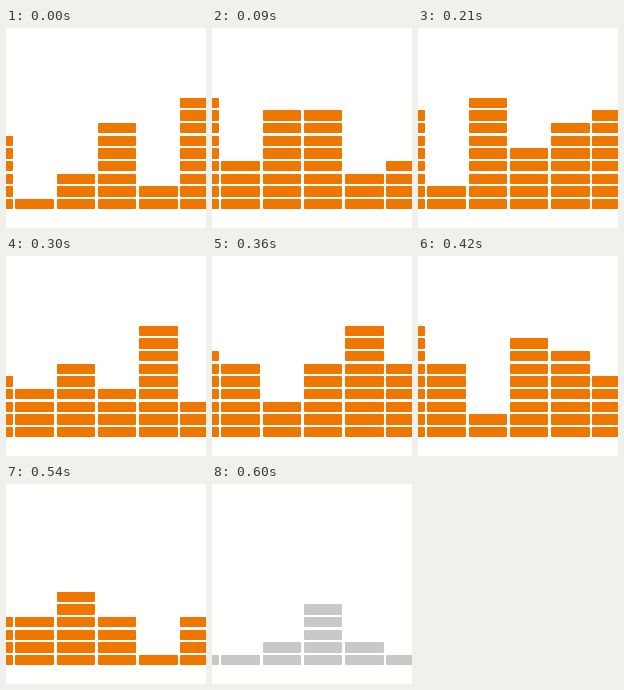
Recreate the animation shown at these times as an HTML page with a canvas. Size 200 px wide and 200 px high, loop 0.63 s.

```html
<!DOCTYPE html>
<html lang="en">
<head>
<meta charset="utf-8">
<title>Equalizer</title>
<style>
html, body { margin: 0; width: 100%; height: 100%; overflow: hidden; background: #fff; }
canvas { display: block; width: 200px; height: 200px; }
</style>
</head>
<body>
<canvas id="stage" width="200" height="200"></canvas>
<script>
const ctx = document.getElementById('stage').getContext('2d');
const STEP = 30, STEPS = 21, IDLE = 19;
const ORANGE = '#ef7700', GREY = '#c8c8c8';
const LEFT = -31.9, BAR_W = 38.6, BAR_PITCH = 41.25;
const BASE = 170.8, BLOCK_H = 10.4, ROW_PITCH = 12.63;

// A bar swings around a slowly drifting level; `peak` is the step of its first crest
const wave = (mid, drift, swing, period, peak) => step =>
  mid + drift * step + swing * Math.cos(2 * Math.PI * (step - peak) / period);

const bars = [
  wave(8.5, -0.15, 2.4, 9.4, 5),
  wave(1.98, 0.23, 1.85, 9.4, 3.3),
  wave(5.85, 0, 3.65, 16, 5.8),
  wave(6.6, -0.08, 2.15, 11.5, 2.7),
  wave(6.38, -0.1, 4.1, 19, 10.4),
  wave(7.05, -0.2, 2.5, 6.22, 0.5)
];

// At rest the bars form a small peak around the fourth one
const rest = col => 5 - 3 * Math.abs(col - 3);

function block(col, row) {
  const x = LEFT + col * BAR_PITCH, y = BASE - row * ROW_PITCH;
  const left = Math.round(x), top = Math.round(y);
  ctx.roundRect(left, top, Math.round(x + BAR_W) - left, Math.round(y + BLOCK_H) - top, 1);
}

function draw(step) {
  const idle = step >= IDLE;
  ctx.fillStyle = '#fff';
  ctx.fillRect(0, 0, 200, 200);
  ctx.fillStyle = idle ? GREY : ORANGE;
  ctx.beginPath();
  bars.forEach((level, col) => {
    const count = Math.max(1, Math.round(idle ? rest(col) : level(step)));
    for (let row = 0; row < count; row++) block(col, row);
  });
  ctx.fill();
}

const start = performance.now();
function tick() {
  draw(Math.floor((performance.now() - start) / STEP) % STEPS);
  requestAnimationFrame(tick);
}
tick();
</script>
</body>
</html>
```
